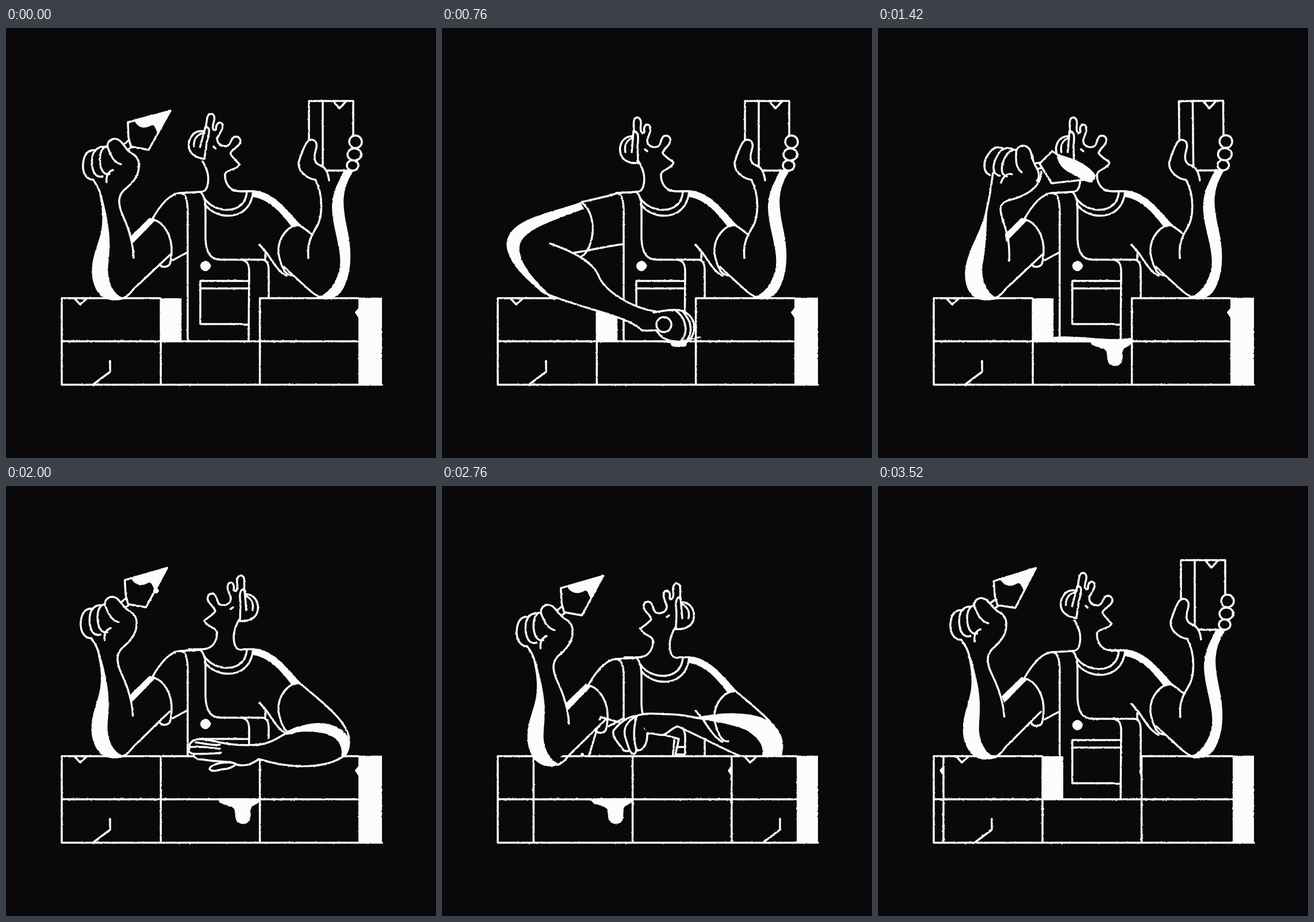
Write an HTML page that moves like this. It is 748 px wide and 748 px high and loops after 3.56 s.

```html
<!DOCTYPE html>
<html lang="en">
<head>
<meta charset="utf-8">
<title>Bricklayer</title>
<style>
  html, body { margin: 0; width: 100%; height: 100%; overflow: hidden; background: #0a080b; }
  svg { display: block; width: 100vw; height: 100vh; }
  #art { stroke: #fdfbfe; stroke-width: 3.5; stroke-linecap: round; stroke-linejoin: round; fill: none; }
</style>
</head>
<body>
<svg viewBox="0 0 748 748">
  <defs>
    <filter id="rough" filterUnits="userSpaceOnUse" x="0" y="0" width="748" height="748" color-interpolation-filters="sRGB">
      <feTurbulence type="fractalNoise" baseFrequency=".22" numOctaves="2" seed="4"/>
      <feDisplacementMap in="SourceGraphic" scale="2.4" xChannelSelector="R" yChannelSelector="G"/>
    </filter>
    <clipPath id="behind"><rect width="748" height="470"/></clipPath>
    <clipPath id="front"><rect x="97" width="520" height="748"/></clipPath>
  </defs>
  <g id="art" filter="url(#rough)"></g>
</svg>
<script>
const BG = '#0a080b', WHITE = '#fdfbfe', LOOP = 3560;
const art = document.getElementById('art');

// [ms, drawing number]
const CUES = [[0,0],[90,1],[420,5],[520,6],[580,7],[670,8],[1090,13],[1180,14],[1240,15],[1420,17],
  [1520,18],[1760,21],[1850,22],[2000,24],[2090,25],[2330,28],[2420,29],[2760,33],[2850,34],[2910,35],
  [3000,36],[3520,42],[3560,43]];

const TRACKS = {
  crouch: [[27,0],[30,22],[33,14],[36,8],[42,2],[43,0]],
  slide: [[29,0],[31,32],[33,110],[36,285],[39,430],[42,500],[43,518]],
  tilt: [[0,10],[4,0],[38,0],[41,10]],
  face: [[18,1],[21,-1],[36,-1],[39,1]],
  swing: [[0,0],[1,.15],[2,.5],[3,1],[17,1],[18,.8],[19,.45],[20,.15],[21,0]],
  sway: [[0,0],[17,0],[21,-.5],[24,-1],[33,-1],[42,-2],[43,0]],
  spread: [[7,80],[8,88],[9,72],[13,0],[15,-62]],
  lift: [[14,0],[17,-.6],[18,-6],[19,-22],[20,-48],[21,-78],[36,-62],[37,-45],[38,-28],[39,-14],[40,-5],[41,-1],[42,0]],
  lay: [[22,5],[24,0],[25,0],[27,7]],
  reach: [[28,20],[30,60],[33,0],[35,-22]]
};

const lerp = (a, b, t) => a + (b - a) * t;
function track(keys, x) {
  if (x <= keys[0][0]) return keys[0][1];
  for (let i = 1; i < keys.length; i++) {
    const [x0, y0] = keys[i - 1], [x1, y1] = keys[i];
    if (x <= x1) return lerp(y0, y1, (x - x0) / (x1 - x0));
  }
  return keys[keys.length - 1][1];
}
const at = (name, n) => track(TRACKS[name], n);

const line = d => `<path d="${d}"/>`;
const solid = d => `<path d="${d}" fill="${BG}"/>`;
const cover = d => `<path d="${d}" fill="${BG}" stroke="none"/>`;
const ink = d => `<path d="${d}" fill="${WHITE}" stroke-width="1.6"/>`;
const box = (x, y, w, h, fill) => w > 0 ? `<rect x="${x}" y="${y}" width="${w}" height="${h}" fill="${fill}" stroke="none"/>` : '';
const group = (transform, s) => `<g transform="${transform}">${s}</g>`;

// Blend two paths that share the same commands
function mix(a, b, t) {
  const to = b.match(/[\d.]+/g);
  let i = 0;
  return a.replace(/[\d.]+/g, v => lerp(+v, +to[i++], t).toFixed(1));
}

const BODY =
  line('M303 287L340 285M412 284H430') +
  line('M303 287C314 288 316 302 316 320V545M338 285C346 292 347 304 347 320V366C348 392 356 403 374 403H408C420 404 423 412 423 424L422 545') +
  line('M408 403H446C454 404 457 410 457 422V500M451 392V404') +
  line('M347 308C366 334 424 338 430 285M344 295C362 324 416 326 419 285') +
  line('M422 440H338V515H411M338 453H421M414 516H422') +
  ink('M429 283C462 284 486 314 511 342L498 346C480 322 460 298 430 293Z') +
  `<circle cx="347" cy="414" r="8.5" fill="${WHITE}" stroke-width="1"/>`;

const NECK = 'M342 232C352 248 354 262 350 276C348 282 345 285 338 285M381 254C380 266 386 278 396 282C404 285 410 284 430 284';
const HEAD =
  solid('M332 188C314 188 308 204 310 216C312 230 326 236 341 235') +
  line('M331 191C320 196 317 206 319 216') +
  solid('M334 182C334 176 332 162 335 158C341 152 347 158 346 168C344 180 348 186 352 181C350 172 354 166 360 169C366 174 360 186 357 194C356 204 366 210 376 206C382 202 380 192 386 188C394 185 400 192 396 200C392 208 384 212 384 218C388 224 398 230 403 234C401 240 394 244 388 247C382 250 381 253 381 256') +
  line('M333 180C342 178 342 190 340 206L341 235M333 180L330 216M353 211L357 214');

function head(n) {
  const f = at('face', n);
  return group(`translate(${374 - 374 * f} 0) scale(${f} 1)`,
    cover('M342 232L350 276L396 282L381 254Z') + line(NECK) + group(`rotate(${at('tilt', n)} 385 255)`, HEAD));
}

const SHOULDER = 'M254 333C266 312 284 288 303 287';
const UP = {
  limb: 'M222 400C221 372 214 350 204 328C192 302 196 288 210 278C224 266 232 254 231 238M150 262C162 278 164 286 166 300C176 350 160 380 154 402C146 430 154 472 190 472C208 472 214 464 222 454L286 394',
  fill: 'M222 400L204 328L198 290L231 238L150 262L166 300L178 400L190 470L286 394Z',
  band: 'M166 292C180 350 152 384 151 412C148 448 164 472 188 473L206 471C186 466 174 440 177 412C180 384 184 360 166 292Z',
  handle: 'M213 196L202 205M222 205L213 211',
  blade: 'M212 164L286 144L248 212L217 206L213 190Z',
  mortar: 'M224 161Q255 153 286 144L264 182C260 172 258 165 250 170C242 174 230 174 224 161Z'
};
const SIDE = {
  limb: 'M228 405C230 378 224 352 217 334C210 312 212 306 226 300C262 292 284 274 284 250M200 252C197 275 195 290 190 312C184 350 172 372 160 396C146 428 152 472 188 472C208 472 214 464 222 454L286 394',
  fill: 'M228 405L217 334L214 306L284 250L200 252L190 312L181 400L190 470L286 394Z',
  band: 'M190 306C184 350 160 380 155 408C150 448 164 472 188 473L210 471C190 466 178 440 181 412C188 380 188 340 190 306Z',
  handle: 'M283 234L270 236M286 243L274 246',
  blade: 'M303 214L376 262L302 270L286 244L281 236Z',
  mortar: 'M311 220Q362 232 378 257L372 268C360 268 350 260 344 256C330 250 314 242 311 220Z'
};
const FIST =
  solid('M152 264C138 264 131 248 135 230C138 216 146 211 157 213') +
  solid('M168 258C150 264 146 232 152 218C157 208 166 205 174 208') +
  solid('M180 254C164 258 160 228 166 214C170 206 174 205 178 206') +
  solid('M200 237C186 233 182 220 177 208C174 196 188 188 198 196C206 203 208 212 222 220C230 226 232 234 231 240') +
  line('M186 247C177 250 174 258 175 268');

function raisedArm(n) {
  const k = at('swing', n), blend = p => mix(UP[p], SIDE[p], k);
  return line(SHOULDER) + ink('M250 331L216 364L220 374L258 335Z') +
    line('M254 333C274 336 290 362 288 392C287 404 286 410 284 412C278 418 268 416 266 408M290 404L316 390') +
    group(`rotate(${at('sway', n)} 188 470)`,
      cover(blend('fill')) + line(blend('limb')) + ink(blend('band')) +
      line(blend('handle')) + solid(blend('blade')) + ink(blend('mortar')) +
      group(`translate(${54 * k} ${7 * k}) rotate(${24 * k} 182 230)`, FIST));
}

const CHEST =
  cover('M218 373L284 358L304 312L345 348L300 378L240 445L190 470L165 440Z') +
  line('M218 373C252 368 276 364 284 358M345 350C330 362 318 366 302 378C280 396 262 426 240 446C226 460 214 470 194 472L172 468') +
  ink('M246 332C226 352 218 364 206 374C180 382 150 402 147 436C148 456 158 468 178 470L190 470C168 456 162 436 172 414C182 388 210 378 222 372C230 362 244 348 256 336Z') +
  solid('M358 246L368 277L408 278L411 236') +
  ink('M343 214C346 206 362 212 372 208C380 196 384 186 393 187C402 194 410 200 412 206L411 240C402 232 392 238 388 246C376 252 366 248 358 238C348 238 342 226 343 214Z') +
  line('M370 277L365 286M380 278L374 290') +
  solid('M378 297C392 292 400 306 390 314L380 318') +
  solid('M338 290C350 276 372 290 379 312C382 326 376 332 368 333') +
  solid('M322 306C322 290 340 288 352 300C370 314 372 332 352 342') +
  solid('M284 358C294 344 296 318 306 308C316 302 326 306 334 312C350 322 356 340 340 348C332 356 322 364 314 366') +
  line('M315 330L330 334L324 344L333 350');

function chestArm(n) {
  const turn = { 4: -9, 6: 9, 16: -5 }[n] || 0;
  return line(SHOULDER) +
    line('M274 394C266 404 268 414 278 416C286 414 288 400 286 386L316 372') +
    group(`rotate(${turn} 178 440)`, CHEST) + line('M252 333C268 338 278 350 280 362');
}

function spreadArm(n) {
  const h = at('spread', n), e = h / 2;
  const y = n === 7 ? -22 : 0;
  const upper = `188 375C214 384 ${224 + e} 402 ${236 + e} 430C${246 + e} 458 ${260 + h} ${488 + y} ${300 + h} ${493 + y}`;
  const lower = `${276 + h} ${526 + y}C${250 + h} ${500 + y} ${210 + e} 490 176 460C140 428 112 404 116 372`;
  return line('M303 288C284 294 262 298 242 303C262 316 268 352 256 380C248 400 236 404 222 394M220 392C246 390 280 380 316 376') +
    cover(`M${upper}L${lower}Z`) + line(`M${upper}M${lower}`) +
    ink('M240 304C200 320 118 330 113 374C112 404 146 440 196 473C160 440 132 410 134 380C138 350 190 336 246 314Z') +
    group(`translate(${h} ${y})`,
      cover('M276 526L304 530L340 545L362 538L366 510L346 492L296 495Z') +
      line('M276 526C296 528 300 522 304 530C312 546 350 552 362 538C372 520 366 500 346 492C330 488 312 492 296 495') +
      line('M334 491C352 504 358 528 344 544M346 492C360 508 366 526 354 543') +
      '<circle cx="314" cy="516" r="13"/>');
}

const trowelArm = n =>
  n > 6 && n < 16 ? spreadArm(n) : [4, 5, 6, 16].includes(n) ? chestArm(n) : raisedArm(n);

const SLEEVE = line('M511 343C490 342 472 366 474 392C478 414 486 432 498 430M441 377L454 392C466 410 474 424 488 431');
const finger = (x, y, rx, ry) => `<ellipse cx="${x}" cy="${y}" rx="${rx}" ry="${ry}" fill="${BG}"/>`;
const HOLD =
  cover('M526 400L548 320L538 262L600 250L576 310L592 400L556 470Z') +
  solid('M527 127H604V248H527Z') + line('M551 127V248M569 127L580 140L592 127') +
  solid('M526 400C524 380 528 366 538 350C552 330 552 290 538 264C524 262 508 250 509 234C514 218 518 206 524 198C532 190 542 196 540 208C536 222 534 232 544 238C552 240 560 246 562 265') +
  ink('M588 249L603 249C582 282 584 308 592 346C602 390 600 420 590 444C582 466 568 474 540 469C560 466 580 440 582 410C584 380 566 340 568 306C570 280 582 264 588 249Z') +
  finger(603, 239, 10, 9) + finger(606, 220, 12, 10.5) + finger(608, 198, 11, 11);

const LAY =
  cover('M511 343L580 400L597 442L584 472L500 487L440 475V450L474 430V390Z') +
  line('M511 343C550 376 596 410 597 442C597 456 592 468 584 472C556 490 500 494 440 475M440 450C470 446 484 428 508 420') +
  ink('M490 428C530 408 560 410 582 424C594 432 598 444 597 454C594 466 590 472 584 472C588 450 576 436 556 430C536 426 512 424 490 432Z') +
  solid('M398 482C380 478 356 484 354 492C358 500 372 492 384 492C392 490 396 488 400 484') +
  solid('M440 450C410 452 390 450 372 446C352 442 336 438 328 442C320 446 318 450 320 454C316 460 318 464 326 466C326 472 332 476 344 476C360 480 396 478 400 484C416 490 430 482 440 475') +
  line('M322 454C340 452 356 456 372 457M326 466C344 466 360 466 374 464M330 446C346 448 360 452 372 450');

const REACH =
  cover('M511 343L574 394L590 426L580 460L540 460L410 404L392 383L474 386Z') +
  line('M511 343C545 372 584 402 590 426C594 440 590 456 584 466') +
  line('M392 383C420 383 432 388 444 389M410 404C500 446 520 462 560 466') +
  ink('M440 390C490 378 540 380 566 394C586 410 594 430 591 444C590 452 588 460 584 466L554 466C566 440 552 424 530 410C500 398 470 394 440 390Z');
const GRIP =
  solid('M276 388L412 426L392 520H236Z') + line('M404 428L396 520') +
  cover('M340 385L394 383L412 404L384 419L357 416Z') +
  solid('M340 386C320 386 306 402 298 412C296 424 308 434 316 446C322 448 326 448 328 444') +
  solid('M340 386C322 394 314 408 319 424C324 438 326 452 334 452C340 450 338 440 338 432') +
  solid('M338 388C334 404 332 424 338 444C346 450 358 438 357 416') +
  line('M338 386C352 380 374 382 394 383M357 416C370 416 378 420 385 419C394 416 398 408 410 404');

function brickArm(n) {
  if (n > 21 && n < 28) return group(`rotate(${at('lay', n)} 590 460)`, LAY) + SLEEVE;
  if (n > 27 && n < 36) return REACH + SLEEVE + group(`translate(0 ${at('reach', n)})`, GRIP);
  return SLEEVE + line('M511 343L531 358M484 416L530 458C540 466 548 470 557 471') +
    group(`rotate(${at('lift', n)} 557 470)`, HOLD);
}

function wall(n) {
  const s = at('slide', n), L = 97, R = s < 6 ? 613 : 617, END = 654, W = 172.3;
  const inside = x => x > L + 2 && x < R + 2;
  let out = box(L, 545, END - L, 76, BG), lines = '', openEnd = false;
  for (let k = 0; k < 6; k++) {
    const x = L + W * k - s, a = Math.max(L, x), b = Math.min(R, x + W);
    if (b <= a) continue;
    if (k === 4 || (k === 1 && n < 22)) {
      out += box(a, 470, Math.min(x + 36, END) - a, 75, WHITE);
      if (x + W > R + 2) openEnd = true;
    } else {
      out += box(a, 470, b - a, 75, BG);
      lines += `M${a} 470H${b}`;
    }
    if (inside(x)) lines += `M${x} 470V620`;
    if (k % 3 === 0) {
      if (inside(x + 22) && inside(x + 43)) lines += `M${x + 22} 470L${x + 32} 481L${x + 43} 471`;
      if (inside(x + 56) && inside(x + 84)) lines += `M${x + 84} 579V598L${x + 56} 619`;
    }
    if (k % 3 === 2 && inside(x + W)) out += ink(`M${x + W} 487L${x + W - 6} 495L${x + W} 504Z`);
  }
  out += box(R, openEnd ? 545 : 469, END - R, openEnd ? 76 : 152, WHITE);
  return out + line(lines + `M${L} 470V620.5H${END}M${L} 545H${R}`) + mortar(n, -s);
}

function mortar(n, x) {
  if (n < 9) return '';
  const left = Math.max(305, 368 + at('spread', n));
  const grow = Math.min(1, (n - 8) / 4);
  const strip = n < 22 ? ink(`M${left} 538Q${left + 20} 536 ${(left + 442) / 2} 540T442 539V546H${left}Z`) : '';
  const drip = ink('M370 544C370 556 392 552 398 562C401 572 396 586 412 587C428 587 424 572 425 562C426 552 440 556 441 544Z');
  return `<g clip-path="url(#front)">` + group(`translate(${x} 0)`,
    strip + group(`translate(0 ${544 - 544 * grow}) scale(1 ${grow})`, drip)) + '</g>';
}

// A drop gathers on the trowel, then falls
function drop(n) {
  if (n < 22 || n > 33) return '';
  const fall = Math.max(0, (n - 26) / 7);
  const y = fall ? 190 + 277 * fall ** 2 : 176 + (n - 22) * 3;
  return `<circle cx="${lerp(261, 244, fall)}" cy="${y}" r="${fall ? 2.5 : 4.5}" fill="${WHITE}" stroke-width="1"/>`;
}

function draw(n) {
  const dy = `translate(0 ${at('crouch', n)})`;
  const arm = group(dy, brickArm(n));
  const hidden = n > 27 && n < 36;
  art.innerHTML = group(dy, BODY + head(n)) +
    (hidden ? `<g clip-path="url(#behind)">${arm}</g>` : '') +
    wall(n) + (hidden ? '' : arm) + group(dy, trowelArm(n)) + drop(n);
}

let shown = -1;
const start = performance.now();
function tick() {
  const t = (performance.now() - start) % LOOP;
  const n = Math.min(42, Math.floor(track(CUES, t) + 1e-6));
  if (n !== shown) draw(shown = n);
  requestAnimationFrame(tick);
}
tick();
</script>
</body>
</html>
```
